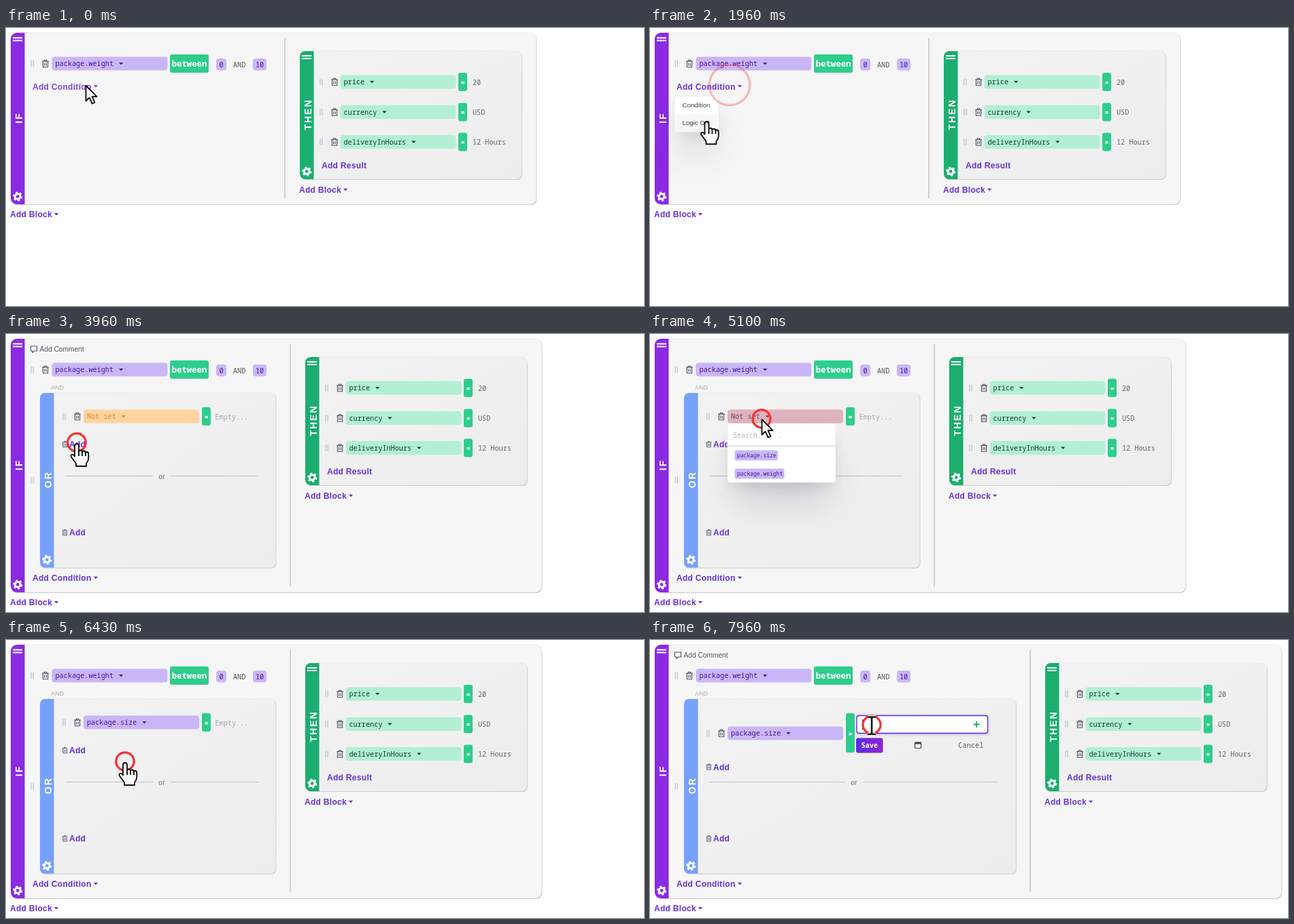
Write an HTML page that moves like this. It is 938 px wide and 410 px high and loops after 8 s.

```html
<!DOCTYPE html>
<html lang="en">
<head>
<meta charset="utf-8">
<title>Rule editor</title>
<style>
html, body { margin: 0; width: 100%; height: 100%; overflow: hidden; background: #fefefe; }
svg { display: block; width: 938px; height: 410px; }
text { white-space: pre; }
.mono { font-family: "Noto Sans Mono", "DejaVu Sans Mono", monospace; font-size: 10.2px; }
.sans { font-family: "Liberation Sans", Arial, sans-serif; }
.link { font-weight: 700; font-size: 12px; letter-spacing: .3px; fill: #6530dc; }
.side { font-weight: 700; font-size: 14px; letter-spacing: 2px; fill: #fff; text-anchor: middle; }
.mid { text-anchor: middle; }
.bold { font-weight: 700; }
</style>
</head>
<body>
<svg viewBox="0 0 938 410">
  <defs>
    <filter id="far" x="-150%" y="-300%" width="400%" height="700%"><feGaussianBlur stdDeviation="26"/></filter>
    <filter id="near" x="-100%" y="-200%" width="300%" height="500%"><feGaussianBlur stdDeviation="13"/></filter>
    <filter id="thin" x="-20%" y="-50%" width="140%" height="200%"><feGaussianBlur stdDeviation="2"/></filter>
    <linearGradient id="panel" x2="1" y2="1"><stop stop-color="#f3f3f3"/><stop offset="1" stop-color="#ededef"/></linearGradient>
    <linearGradient id="save"><stop stop-color="#5a2be0"/><stop offset="1" stop-color="#9325d8"/></linearGradient>
  </defs>
  <g id="scene"></g>
</svg>
<script>
const LOOP = 8000;
const VIOLET = '#8a2be2', LILAC = '#cab6f7', MINT = '#b2efd3', GREEN = '#2ecd8c';
const INK = '#4216a4';
const scene = document.getElementById('scene');

// Clicks: time and place
const clicks = [[965, 117, 84], [2370, 81, 140], [3515, 104, 160], [4665, 164, 125], [5990, 175, 179], [7525, 326, 125]];
// Start and end of the cursor trip to each following click
const trips = [[1560, 2100], [3290, 3490], [4130, 4560], [5430, 5880], [6760, 7300]];

const clamp = v => Math.max(0, Math.min(1, v));
const ramp = (t, from, ms = 150) => clamp((t - from) / ms);
const ease = k => k < .5 ? 4 * k ** 3 : 1 - 4 * (1 - k) ** 3;

const rect = (x, y, w, h, fill, r = 0, more = '') =>
  `<rect x="${x}" y="${y}" width="${w}" height="${h}" rx="${r}" fill="${fill}" ${more}/>`;
const path = (d, more) => `<path d="${d}" ${more}/>`;
const text = (x, y, s, cls, fill, more = '') =>
  `<text x="${x}" y="${y}" class="${cls}" ${fill ? `fill="${fill}"` : ''} ${more}>${s}</text>`;
const group = (body, opacity, move = '') =>
  opacity > 0 ? `<g opacity="${opacity}" ${move && `transform="translate(${move})"`}>${body}</g>` : '';

const caret = (x, y, fill) => path(`M${x - 3.2} ${y - 1.6}h6.4l-3.2 3.4z`, `fill="${fill}"`);
const grip = (x, y) => path(`M${x} ${y - 5}v10m3 -10v10`, 'stroke="#c6c6cc" stroke-width="1.4"');
const trash = (x, y, k = 1) =>
  `<g transform="translate(${x} ${y}) scale(${k})">` +
  path('M-4.8 -3.4H4.8M-1.8 -3.6V-5.2H1.8V-3.6M-3.6 -3.2V5.2H3.6V-3.2M-1.3 -1V3.3M1.3 -1V3.3',
    'fill="none" stroke="#4c5266" stroke-width="1.1"') + '</g>';
const gear = (x, y) => `<g transform="translate(${x} ${y})" fill="none" stroke="#fff">
  <circle r="3.9" stroke-width="3"/><circle r="5.9" stroke-width="2.4" pathLength="12" stroke-dasharray="1"/></g>`;
const link = (x, y, s, arrow) =>
  text(x, y, s, 'sans link') + (arrow ? caret(arrow, y - 4.6, '#6530dc') : '');
const lines = (x, y) => path(`M${x} ${y}h14m-14 4h14`, 'stroke="#fff" stroke-width="1.8"');

function pill(x, y, s, fill, ink) {
  return rect(x, y - 10, 170, 20, fill, 4) + text(x + 5, y + 3.5, s, 'mono', ink) +
    caret(x + 16 + s.length * 6.12, y, ink);
}

function op(x, y, h, cy = y) {
  return rect(x, y - h / 2, 13, h, GREEN, 3) + text(x + 6.5, cy + 4, '=', 'mono bold mid', '#fff');
}

function block(x, y, right, bottom, color, label, r, fill) {
  const h = bottom - y, cy = (y + bottom) / 2;
  return rect(x + .5, y + .8, right - x + .3, h + .3, '#c4c4c6', r) +
    rect(x, y, right - x, h, fill, r, 'stroke="#e2e2e4" stroke-width=".6"') +
    path(`M${x + 20.5} ${y}V${bottom}H${x + r}a${r} ${r} 0 0 1 ${-r} ${-r}V${y + r}a${r} ${r} 0 0 1 ${r} ${-r}z`, `fill="${color}"`) +
    text(0, 0, label, 'sans side', '', `transform="translate(${x + 16.5} ${cy - 1}) rotate(-90)"`) +
    gear(x + 10.2, bottom - 11.5);
}

function resultRow(y, name, value) {
  return grip(462, y) + trash(483, y) + pill(491.5, y, name, MINT, '#123d2d') +
    op(665, y, 27) + text(686, y + 4, value, 'mono', '#66666c');
}

function results() {
  return block(432, 34, 758, 223, '#1bae6f', 'THEN', 8, 'url(#panel)') + lines(435, 41) +
    resultRow(79.5, 'price', 20) + resultRow(124, 'currency', 'USD') +
    resultRow(168, 'deliveryInHours', '12 Hours') +
    link(464, 206.5, 'Add Result') + link(431, 243, 'Add Block', 499);
}

function ifRow() {
  return grip(37.2, 52.5) + trash(58, 52.5) + pill(67.5, 52.5, 'package.weight', LILAC, INK) +
    rect(241, 39, 57, 27, GREEN, 3) +
    text(269.5, 57, 'between', 'mono bold mid', '#fff', 'style="font-size:12.3px"') +
    rect(309, 45, 15, 17.5, LILAC, 4) + text(316.5, 57.5, 0, 'mono mid', INK) +
    text(334, 57.5, 'AND', 'mono', '#55555c') +
    rect(363, 45, 20, 17.5, LILAC, 4) + text(373, 57.5, 10, 'mono mid', INK);
}

function comment() {
  return path('M36.5 18h9v7h-4l-2.5 2.4v-2.4h-2.5z', 'fill="none" stroke="#4c5266" stroke-width="1.1"') +
    text(49.5, 26.2, 'Add Comment', 'sans', '#55555c', 'font-size="10.2"');
}

function orBlock(right, addY) {
  const end = right - 25.5, mid = (87 + end) / 2;
  return text(66, 81.5, 'AND', 'sans', '#adadb2', 'font-size="9"') + grip(37.2, 215.5) +
    block(50, 87, right, 344.5, '#76a1fb', 'OR', 7, 'url(#panel)') +
    trash(86.5, addY - 4.4, .8) + link(93, addY, 'Add') +
    path(`M87 209.5H${mid - 13}M${mid + 13} 209.5H${end}`, 'stroke="#b9bcc9"') +
    text(mid, 213.5, 'or', 'sans mid', '#707078', 'font-size="10.5"') +
    trash(86.5, 292.8, .8) + link(93, 297.2, 'Add');
}

function orRow(y, picked, hover, editing) {
  const field = picked ? pill(114, y, 'package.size', LILAC, INK)
    : pill(114, y, 'Not set', '#ffd4a1', '#e2831d') + group(pill(114, y, 'Not set', '#dfb3be', '#6a4a62'), hover);
  return grip(84, y) + trash(105, y) + field +
    (editing ? op(288, 137, 58, y) : op(288, y, 27) + text(307.5, y + 4.5, 'Empty...', 'mono', '#a6a6ac'));
}

function editor() {
  return rect(304, 112, 193, 27, '#5a2be0', 3, 'opacity=".35" filter="url(#thin)"') +
    rect(304, 111.5, 192.5, 26, '#fff', 3, 'stroke="#5a2be0" stroke-width="1.3"') +
    path('M312.5 117v15', 'stroke="#222"') +
    path('M475.5 124.5h9m-4.5 -4.5v9', 'stroke="#1bae6f" stroke-width="1.8"') +
    rect(303, 144.5, 39.5, 22, 'url(#save)', 3) + text(322.7, 159, 'Save', 'mono bold mid', '#fff') +
    rect(389.5, 151, 9, 8.5, 'none', 1, 'stroke="#44444c" stroke-width="1.2"') + rect(389.5, 150.5, 9, 3, '#44444c') +
    text(453, 159, 'Cancel', 'mono', '#55555c', 'style="font-size:10.4px"');
}

function card(x, y, w, h) {
  return rect(x + 8, y + 38, w - 16, h - 8, '#32325d', 4, 'opacity=".17" filter="url(#far)"') +
    rect(x + 10, y + 20, w - 20, h - 20, '#000', 4, 'opacity=".16" filter="url(#near)"') +
    rect(x, y, w, h, '#fff', 4, 'stroke="#e4e4e8" stroke-width=".5"');
}

function menu(hover) {
  const item = (y, s) => text(47.5, y, s, 'sans', '#404046', 'font-size="9.7"');
  return card(36, 100.5, 65, 53) + group(rect(36, 127, 65, 26, '#f2f6fa', 3), hover) +
    item(117, 'Condition') + item(143.3, 'Logic OR');
}

function popup(hover) {
  const item = (y, w, s) => rect(124.5, y - 7.5, w, 15, LILAC, 3) +
    text(128, y + 3, s, 'mono', INK, 'style="font-size:8px"');
  return card(114, 132, 159, 87) + text(122, 153, 'Search......', 'mono', '#b4b4ba', 'style="font-size:10px"') +
    path('M114 165h159', 'stroke="#c9c9cd"') + group(rect(114, 166, 159, 26, '#f2f6fa'), hover) +
    item(179, 63.5, 'package.size') + item(206, 73, 'package.weight');
}

const pen = 'fill="#fff" stroke="#111" stroke-linejoin="round"';
const cursors = {
  arrow: path('M.5 1V23.5L5.7 18.7L9.6 27.5L13.4 25.8L9.5 17.2H16.5Z', pen + ' stroke-width="1.9"'),
  hand: path('M-3 5Q-3 2 0 2Q3 2 3 5V14Q3 11.5 5.5 11.5Q8 11.5 8 14.5Q8 12.5 10.5 12.5Q13 12.5 13 16Q13 14 15 14Q17.3 14 17.3 17.5V23Q17.3 27 14 31V35H-1V31L-7.6 22Q-9.5 19 -7.5 18Q-5.5 17 -3 20.5Z M3 14V20 M8 15V20 M13 16V20',
    pen + ' stroke-width="1.9"'),
  beam: ['stroke="#fff" stroke-width="5"', 'stroke="#111" stroke-width="2.6"'].map(s =>
    path('M-6 -11.5H-2Q0 -11.5 0 -9.5V12Q0 14 -2 14H-6M6 -11.5H2Q0 -11.5 0 -9.5M0 12Q0 14 2 14H6', 'fill="none" ' + s)).join('')
};

function pointer(t) {
  let [, x, y] = clicks[0];
  trips.forEach(([from, to], i) => {
    const k = ease(ramp(t, from, to - from));
    x += (clicks[i + 1][1] - clicks[i][1]) * k;
    y += (clicks[i + 1][2] - clicks[i][2]) * k;
  });
  let kind = 'arrow';
  if (t > 7600) kind = 'beam';
  else if ((t > 1560 && t < 4200 && y > 101) || (t > 5430 && t < 6880 && y > 166)) kind = 'hand';
  return group(cursors[kind], 1, `${x} ${y}`);
}

function rings(t) {
  return clicks.map(([at, x, y]) => {
    const k = (t - at) / 1170;
    return k > 0 && k < 1 ? `<circle cx="${x}" cy="${y}" r="${35 * k}" fill="none" stroke="#fa2f33"
      stroke-width="3.2" opacity="${Math.min(1, (1 - k) * 2.2)}"/>` : '';
  }).join('');
}

function draw(t) {
  const nested = t >= 2440, added = t >= 3590, picked = t >= 6060, editing = t >= 7600;
  const shift = editing ? 149 : added ? 8 : 0;
  const bottom = nested ? 381 : 260;
  const note = ramp(t, 60, 200) - ramp(t, 1000) + ramp(t, 2560, 200) - ramp(t, 4720) + ramp(t, 7620);
  const menuOn = ramp(t, 1020) - ramp(t, 2420);
  const popupOn = ramp(t, 4730) - ramp(t, 6060);
  const addLink = bottom - (nested ? 17 : 169.5);

  let out = block(7, 7, 779.5 + shift, bottom, VIOLET, 'IF', 9, '#f6f6f6') + lines(10, 14.5) +
    path(`M${410 + shift} 15V${bottom - 9}`, 'stroke="#c9c9cc" stroke-width="1.6"') +
    group(comment(), note) + ifRow() +
    group(results(), 1, `${shift} 0`);
  if (nested) {
    out += group(orBlock(editing ? 538 : added ? 396.5 : 215.5, editing ? 191.5 : 167), ramp(t, 2400, 250));
  }
  if (added) out += orRow(editing ? 137.5 : 121.5, picked, ramp(t, 4450) - ramp(t, 5650), editing);
  if (editing) out += editor();
  out += group(link(39, addLink, 'Add Condition', 132), .88 + .12 * ramp(t, 60, 200)) +
    link(6, bottom + 19.3, 'Add Block', 74) +
    group(menu(ramp(t, 1850)), menuOn) + group(popup(ramp(t, 5700)), popupOn) +
    rings(t) + pointer(t);
  scene.innerHTML = out;
}

const start = performance.now();
function tick() {
  draw((performance.now() - start) % LOOP);
  requestAnimationFrame(tick);
}
tick();
</script>
</body>
</html>
```
